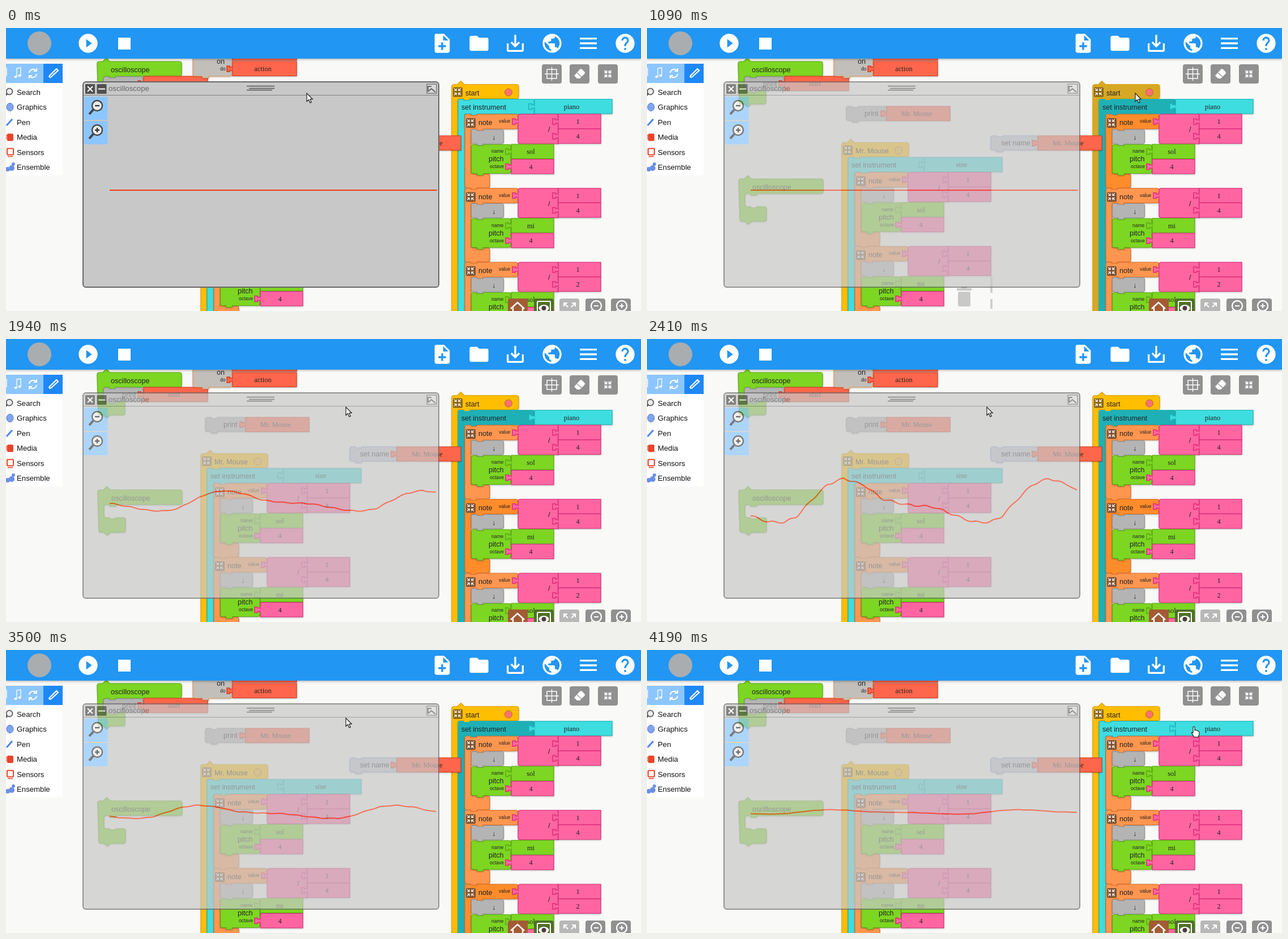
These frames come from a looping animation (1121 by 499 pixels, 4.27 s). An HTML page:

```html
<!DOCTYPE html>
<html lang="en">
<head>
<meta charset="utf-8">
<title>Oscilloscope widget</title>
<style>
html, body { margin: 0; width: 100%; height: 100%; overflow: hidden; background: #f9f9f7; }
svg { display: block; width: 1121px; height: 499px; }
text { font: 12.6px "Liberation Sans", Arial, sans-serif; fill: #222; }
text.value { font: 12.4px "Liberation Serif", serif; text-anchor: middle; }
text.tiny { font-size: 8.5px; }
text.row { font-size: 13.2px; fill: #111; }
.block { filter: drop-shadow(0 1px 1px #0004); }
.hot.start { fill: #d6a825; }
.hot.instrument { fill: #1fb0b6; }
.hot.note { fill: #ff8c2b; }
</style>
</head>
<body>
<svg id="stage" viewBox="0 0 1121 499"></svg>
<script>
const LOOP = 4270, STEP = 77.7, BASE = 770;
const PALETTE = {
  yellow: ['#ffbe00', '#e0a000'], teal: ['#3edde0', '#1bb5ba'], orange: ['#ff964f', '#d8702a'],
  pink: ['#ff66a1', '#df2d7d'], green: ['#7cd622', '#5ca915'], grey: ['#b4b4b4', '#949494'],
  red: ['#ff664b', '#d93c20'], name: ['#c3c5d2', '#7d98dd'], event: ['#c2bfbb', '#e79a50']
};

const shape = (d, color, cls = '') =>
  `<path class="block ${cls}" d="${d}" fill="${PALETTE[color][0]}" stroke="${PALETTE[color][1]}" stroke-width="1.2"/>`;
const rect = (x, y, w, h, fill, r = 0, more = '') =>
  `<rect x="${x}" y="${y}" width="${w}" height="${h}" rx="${r}" fill="${fill}" ${more}/>`;
const line = (d, color, width = 2, more = '') =>
  `<path d="${d}" fill="none" stroke="${color}" stroke-width="${width}" ${more}/>`;
const label = (x, y, s, cls = '', more = '') => `<text x="${x}" y="${y}" class="${cls}" ${more}>${s}</text>`;
const group = (x, y, body, more = '') => `<g transform="translate(${x} ${y})" ${more}>${body}</g>`;

const plug = (x, y, color) =>
  `<path d="M${x} ${y - 3}h-5v-2h-5v10h5v-2h5" fill="${PALETTE[color][0]}" stroke="${PALETTE[color][1]}" stroke-width="1.6"/>`;

// Value block with its connector on the left.
const value = (x, y, w, text, color, plugColor = color) =>
  shape(`M${x} ${y}h${w}v25.5h${-w}z`, color) + plug(x, y + 13, plugColor) +
  label(x + w / 2 - 3, y + 17, text, 'value');

// Stack block with a notch above and a tab below.
const flow = (x, y, w, h, color) =>
  shape(`M${x} ${y + 4}q0-4 4-4h6v2h11v-2h${w - 25}q4 0 4 4v${h - 8}q0 4-4 4h${25 - w}v3h-11v-3h-6q-4 0-4-4z`, color);

const shrinkMark = 'M2 2l4 4m0-4v4h-4M14 2l-4 4m0-4v4h4M2 14l4-4m0 4v-4h-4M14 14l-4-4m0 4v-4h4';
const collapse = (x, y, fill) => group(x, y, rect(0, 0, 17, 17, fill, 2) + line(shrinkMark, '#fff', 1.2));

function note(x, y, pitch, denominator, cls) {
  return group(x, y,
    shape('M0 4q0-4 4-4h6v2h11v-2h69q4 0 4 4v18q0 4-4 4h-58v3h-11v-3h-10v79h10v2h11v-2h8q4 0 4 4v17q0 4-4 4h-19v3h-11v-3h-6q-4 0-4-4z', 'orange', 'note ' + cls) +
    collapse(2, 7, '#7c5030') + label(24, 19, 'note') + label(60, 15, 'value', 'tiny') +
    shape('M94 4q0-4 4-4h67v52h-67q-4 0-4-4z', 'pink') + plug(94, 13, 'pink') + label(147, 31, '/') +
    value(165, 0, 75, 1, 'pink') + value(165, 26, 75, denominator, 'pink') +
    flow(11.5, 27, 57, 25, 'grey') + label(48, 45, '↓') +
    flow(11.5, 53.5, 70, 51, 'green') + label(47, 68, 'name', 'tiny') +
    label(42, 83, 'pitch') + label(44, 95, 'octave', 'tiny') +
    value(82, 53, 75, pitch, 'green') + value(82, 79.5, 75, 4, 'pink'));
}

function stack(x, y, name, instrument, key, notes) {
  return group(x, y,
    shape('M0 10q0-4 4-4h6l6-6 6 6h92q4 0 4 4v17q0 4-4 4h-82v3h-11v-3h-10v400h-11z', 'yellow', key && 'start') +
    collapse(2, 11, '#8a6613') + label(24, 25, name) +
    `<circle cx="100" cy="20" r="6.5" fill="${key ? '#ff7272' : '#edb51d'}" stroke="#ad6a22" stroke-width="1"/>` +
    shape('M11 36q0-4 4-4h6v2h11v-2h110q4 0 4 4v22h-100v3h-11v-3h-12v350h-12z', 'teal', key && 'instrument') +
    label(17, 50, 'set instrument') + value(146, 32, 137, instrument, 'teal') +
    notes.map(([pitch, d], i) => note(23, 58.5 + 130.5 * i, pitch, d, key ? 'n' + i : '')).join(''));
}

const action = (x, y) => group(x, y,
  shape('M0 10q0-4 4-4h6l6-6 6 6h123q4 0 4 4v18q0 4-4 4h-113v3h-11v-3h-6q-4 0-4 4v15q0 4 4 4h6v2h11v-2h13q4 0 4 4v18q0 4-4 4h-22l-6 5-6-5h-5q-4 0-4-4z', 'green') +
  label(24, 25, 'oscilloscope'));

const ring = 'M12 2a10 10 0 1 0 0 20a10 10 0 1 0 0-20z';
const icon = (x, y, d, size = 40, fill = '#fff') =>
  `<path transform="translate(${x - size / 2} ${y - size / 2}) scale(${size / 24})" fill="${fill}" fill-rule="evenodd" d="${d}"/>`;

const blocks =
  action(161, 53) + flow(172, 86, 70, 24, 'grey') + label(205, 103, 'print') + value(243, 85, 113, 'start', 'red') +
  action(162, 260) +
  shape('M330 40h65q4 0 4 4v37q0 4-4 4h-37v3h-11v-3h-13q-4 0-4-4z', 'event') +
  label(372, 63, 'on') + label(378, 75, 'do', 'tiny') +
  shape('M400 40h113v17h-113z', 'red') + value(400, 59, 113, 'action', 'red') +
  flow(352, 138, 71, 25, 'grey') + label(384, 155, 'print') + value(423, 138, 112, 'Mr. Mouse', 'red') +
  stack(344, 196, 'Mr. Mouse', 'sine', '', [['sol', 4], ['mi', 4]]) +
  stack(787, 93.5, 'start', 'piano', 'main', [['sol', 4], ['mi', 4], ['sol', 2]]) +
  flow(607, 190, 83, 25, 'name') + label(625, 207, 'set name') + value(690, 190, 113, 'Mr. Mouse', 'red');

const trash = '<g id="trash">' + rect(547, 459, 26, 4, '#c9c9c7') + rect(555, 456, 10, 4, '#c9c9c7') +
  rect(549, 465, 22, 26, '#c9c9c7', 3) + line('M608 437v30M608 478v17', '#cfcfcd', 4) + '</g>';

const zoomTool = (y, plus) => rect(137.5, y, 42, 41, '#8cc6ff') +
  group(159, y + 19, `<circle cx="2" cy="-3" r="9" fill="#eee" stroke="#444" stroke-width="2.4"/>` +
    line('M-5 4l-7 8', '#444', 4) + line('M-2-3h8' + (plus ? 'M2-7v8' : ''), '#333', 2.4));

const panel = '<g id="panel">' +
  rect(136, 95, 628, 362, '#c8c8c8', 5, 'stroke="#686868" stroke-width="2"') +
  line('M137 118.5h626', '#808080', 1) +
  rect(140, 99, 17, 17, '#505050', 1) + line('M144 103l9 9m0-9l-9 9', '#fff', 2) +
  rect(160.5, 99, 17, 17, '#505050', 1) + line('M163 107.5h12', '#fff', 2) +
  label(181, 111, 'oscilloscope', 'row', 'style="fill:#666"') +
  line('M425 102.5h49M429 106.5h45M425 109.5h45', '#555', 1.4) +
  rect(743, 99, 17, 16, '#d8d8d8', 0, 'stroke="#555"') + line('M745 112v-9h6m-6 9l6-5 7 6', '#666', 2) +
  zoomTool(121, false) + zoomTool(164, true) +
  '<path id="wave" fill="none" stroke="#f43a14" stroke-width="2" stroke-linejoin="round"/></g>';

const rows = ['Search', 'Graphics', 'Pen', 'Media', 'Sensors', 'Ensemble'];
const rowIcons = [
  '<circle cx="6" cy="-1" r="5.5" fill="#eee" stroke="#666" stroke-width="2"/>' + line('M2 3l-6 6', '#555', 3),
  '<ellipse cx="7" cy="0" rx="6" ry="7" fill="#7fa5ee" stroke="#5178cc"/>',
  line('M1 6l10-11', '#4a83ef', 3),
  rect(2, -6, 11, 13, '#ea4428', 2) + line('M0-3h4M0 0h4M0 3h4', '#ea4428', 1.4),
  rect(2, -6, 11, 11, '#fff', 1, 'stroke="#ea4428" stroke-width="2"') + line('M3 8h9', '#ea4428', 1.6),
  '<g fill="#6a8fe5"><circle cx="3" cy="4" r="4"/><circle cx="10" cy="2" r="5"/><circle cx="13" cy="-5" r="3"/></g>'
];
const quaver = (x) => group(x, 80, line('M0 6v-15l7-1v14', '#fff', 1.3) +
  '<g fill="#fff"><ellipse cx="-2" cy="6" rx="2.6" ry="2"/><ellipse cx="5" cy="4" rx="2.6" ry="2"/></g>');
const sidebar = rect(0, 63, 100, 197, '#fff') + rect(0, 63, 66, 34, '#8cc6ff') + rect(66, 63, 34, 34, '#1e88f7') +
  line('M1 70v15', '#fff', 1.3) + quaver(19) +
  line('M41 79a7 7 0 0 1 12-4m1 6a7 7 0 0 1-12 4M54 71v5h-5M41 89v-5h5', '#fff', 2) +
  line('M77 87q-2-2 2-5l10-10 3 3-10 9q-2 3-5 3', '#fff', 2.2) +
  rows.map((name, i) => group(0, 113 + 26.4 * i, rowIcons[i] + label(19, 5, name, 'row'))).join('');

const tile = (x, y, fill, mark) => group(x, y, rect(0, 0, 35, 34, fill, 4) + mark);
const tools =
  tile(946, 64, '#909090', rect(9, 9, 17, 16, 'none', 0, 'stroke="#fff" stroke-width="1.5"') + line('M17.5 5v24M5 17h25', '#fff', 1.3)) +
  tile(995, 64, '#909090', '<path d="M8 20l10-11q2-2 4 0l4 4q2 2 0 4l-8 8h-5z" fill="#fff"/>' + line('M13 15l8 7', '#909090', 1.2)) +
  tile(1045, 64, '#909090', group(9.5, 9, line(shrinkMark, '#fff', 1.8))) +
  tile(886, 477, '#a35b35', line('M5 18l12-11 12 11M9 16v18h17V16', '#fff', 2.4) + line('M17 34V23', '#ef3a3a', 7)) +
  tile(932, 477, '#4f7128', rect(6, 5, 23, 25, 'none', 2, 'stroke="#fff" stroke-width="2"') +
    '<ellipse cx="17.5" cy="17" rx="9" ry="6" fill="#fff"/><circle cx="17.5" cy="17" r="4" fill="#4f3a40"/>') +
  tile(977, 477, '#b8b8b8', line('M8 14V8h6M22 8h6v6M8 23v6h6M22 29h6v-6M9 9l6 6M27 9l-6 6', '#fff', 2)) +
  [1023, 1068].map((x, i) => tile(x, 477, '#909090', '<circle cx="19" cy="13" r="9" fill="none" stroke="#fff" stroke-width="2.3"/>' +
    line('M12 20l-7 8M15 13h8' + (i ? 'M19 9v8' : ''), '#fff', 2.2))).join('');

const header = rect(0, 0, 1121, 54, '#2196f3', 0, 'style="filter:drop-shadow(0 1px 2px #0005)"') +
  '<circle cx="59" cy="27" r="21" fill="#a9adb0"/>' +
  icon(145, 27, ring + 'M10 16.5v-9l6 4.5z') + rect(198, 17, 22, 21, '#fff') +
  icon(770, 27, 'M14 2H6q-2 0-2 2v16q0 2 2 2h12q2 0 2-2V8zM16 16h-3v3h-2v-3H8v-2h3v-3h2v3h3zM13 9V3.5L18.5 9z') +
  icon(835, 27, 'M10 4H4q-2 0-2 2v12q0 2 2 2h16q2 0 2-2V8q0-2-2-2h-8z') +
  icon(899, 27, 'M19 12v7H5v-7H3v7q0 2 2 2h14q2 0 2-2v-7zM13 12.7l2.6-2.6L17 11.5l-5 5-5-5 1.4-1.4 2.6 2.6V3h2z') +
  icon(964, 27, ring + 'M11 20C7 19.4 4 16 4 12l.2-1.8L9 15v1q0 2 2 2zM17.9 17.4Q17.4 16 16 16h-1v-3q0-1-1-1H8v-2h2q1 0 1-1V7h2q2 0 2-2v-.4c3 1.2 5 4 5 7.4q0 3-2.1 5.4z') +
  icon(1028, 27, 'M3 18h18v-2H3zM3 13h18v-2H3zM3 6v2h18V6z') +
  icon(1093, 27, ring + 'M13 19h-2v-2h2zM15 11.3l-.8.9Q13 13.5 13 15h-2v-.5q0-1.700 1.200-2.800l1.200-1.300Q14 9.800 14 9a2 2 0 0 0-4 0H8a4 4 0 0 1 8 0q0 1.300-1 2.300z');

const pointers = '<g id="cursor" fill="#fff" stroke="#111" stroke-width="1.1">' +
  '<path id="arrow" d="M0 0v14.500l3.300-3 2.600 5.500 2.300-1-2.500-5.500h4.500z"/>' +
  '<path id="hand" d="M-2 1.500q0-1.500 1.500-1.500t1.500 1.500v5l1-.5q1.500 0 2 1l2 0q1 0 1 1.500 2 0 2 2v3l-2 5h-7l-4.500-7q0-2 2.500-.5z"/></g>';

const $ = (id) => document.getElementById(id);
$('stage').innerHTML = rect(0, 0, 1121, 499, '#f9f9f7') + blocks + trash + panel + sidebar + tools + header + pointers;

// Keys are [step, ...values]; the step counter is zero at BASE ms.
const PATH = [[-10, 531, 115], [-3, 862, 115], [7, 862, 115], [12, 600, 120], [35, 600, 120], [41, 905, 134], [43, 966, 135]];
const LEVEL = [[8, .02], [9, 52], [15, 18.5], [18, 12], [19, 54], [26, 18.5], [27, 15], [28, 45], [35, 12], [44, 4]]
  .map(([k, level]) => [k, Math.log(level)]);
const PHASE = [[8, 385, 350, -2], [15, 385, 350, 0], [26, 557, 372, 3], [35, 340, 346, 5], [44, 324, 332, 7]];
// One period of the tone, starting at its crest.
const TONE = [[0, -1], [.1, -.7], [.19, -.08], [.3, .16], [.44, .27], [.56, .7], [.63, .93], [.71, .95], [.77, .7], [.84, 0], [.92, -.72], [1, -1]];

function at(keys, k, ease = (u) => u) {
  const i = keys.findIndex((key) => key[0] > k);
  if (i < 1) return (i ? keys[keys.length - 1] : keys[0]).slice(1);
  const a = keys[i - 1], b = keys[i], u = ease((k - a[0]) / (b[0] - a[0]));
  return a.slice(1).map((v, n) => v + (b[n + 1] - v) * u);
}
const smooth = (u) => u * u * (3 - 2 * u);

function wave(k) {
  if (k < 9) return 'M183 286H761';
  const level = Math.exp(at(LEVEL, k)[0]), [crest, period, cycles] = at(PHASE, k);
  let d = '';
  for (let x = 183; x <= 762; x += 4) {
    const u = (x - crest) / period - cycles;
    const ripple = Math.sin(x * .21 + k) * .04;
    d += `${d ? 'L' : 'M'}${x} ${(285.5 + level * (at(TONE, u - Math.floor(u))[0] + ripple)).toFixed(1)}`;
  }
  return d;
}

const HIGHLIGHTS = [['.start', 2, 8], ['.instrument', 3, 39], ['.n0', 4, 14], ['.n1', 14, 22], ['.n2', 22, 39]]
  .map(([selector, from, to]) => [document.querySelector(selector), from, to]);

function render(time) {
  const k = Math.floor((time % LOOP - BASE) / STEP);
  const [x, y] = at(PATH, k, smooth);
  const overBlock = (k >= -3 && k < 3) || k >= 41;
  $('cursor').setAttribute('transform', `translate(${x} ${y})`);
  $('hand').style.display = overBlock ? '' : 'none';
  $('arrow').style.display = overBlock ? 'none' : '';
  $('panel').style.opacity = k < 2 ? 1 : .7;
  $('trash').style.opacity = k >= 2 && k < 9 ? 1 : 0;
  for (const [element, from, to] of HIGHLIGHTS) element.classList.toggle('hot', k >= from && k < to);
  $('wave').setAttribute('d', wave(k));
}

const origin = performance.now();
(function tick() {
  render(performance.now() - origin);
  requestAnimationFrame(tick);
})();
</script>
</body>
</html>
```
